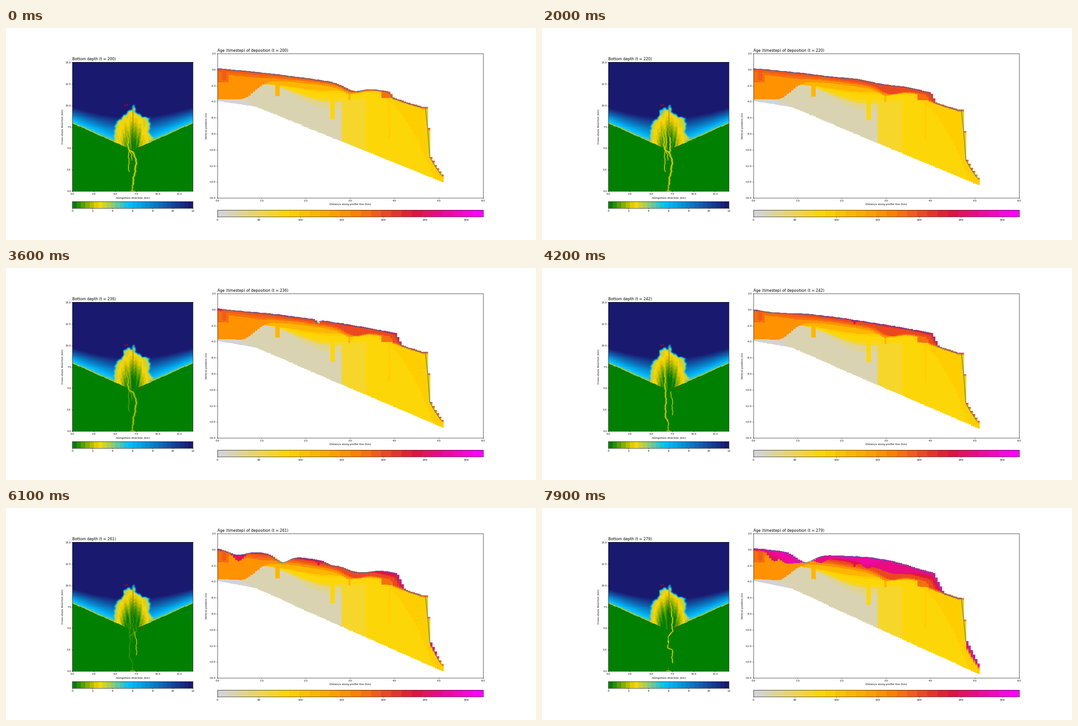
A matplotlib script for the animation above (8000 ms loop, 1183x473 px).

```python
import numpy as np
import matplotlib.pyplot as plt
from matplotlib.animation import FuncAnimation
from matplotlib.colors import LinearSegmentedColormap
from matplotlib.path import Path

W, H = 1183, 473
T0, STEPS = 200, 80
rng = np.random.default_rng(4)
fig = plt.figure(figsize=(W / 72, H / 72), dpi=72, facecolor="white")


# ---------- layout helpers ----------
def panel(left, top, right, bottom):
    ax = fig.add_axes([left / W, 1 - bottom / H, (right - left) / W, (bottom - top) / H])
    for side in ax.spines.values():
        side.set_linewidth(0.7)
    return ax


def ticks(ax, xs, ys, fmt, size):
    ax.set_xticks(xs, [fmt % v for v in xs])
    ax.set_yticks(ys, [fmt % v for v in ys])
    ax.tick_params(length=2.2, width=0.6, labelsize=size)
    ax.tick_params(axis="x", pad=2)
    ax.tick_params(axis="y", pad=1.2)


def label(x, y, text, size=5.9, **kw):
    kw = {"ha": "center", "va": "center", **kw}
    return fig.text(x / W, 1 - y / H, text, fontsize=size, **kw)


def color_bar(left, top, right, bottom, cmap, vmax, step, size):
    ax = panel(left, top, right, bottom)
    ax.imshow(np.linspace(0, vmax, 1200)[None], extent=(0, vmax, 0, 1), aspect="auto",
              cmap=cmap, interpolation="nearest")
    ticks(ax, range(0, vmax + 1, step), [], "%d", size)


def smooth(s):
    s = np.clip(s, 0, 1)
    return s * s * (3 - 2 * s)


depth_map = LinearSegmentedColormap.from_list(
    "depth", [(0, "green"), (0.21, "gold"), (0.47, "deepskyblue"), (1, "midnightblue")], N=28)
age_map = LinearSegmentedColormap.from_list(
    "age", ["lightgray", "gold", "darkorange", "crimson", "magenta"], N=26)


# ---------- cross section ----------
DX, DZ, ZMIN = 0.05, 0.03, -15.0
x = np.arange(102) * DX
z = np.arange(ZMIN, 1, DZ)[:, None]
base = np.minimum(-4 - 0.8 * x, -4.7 - 2.22 * (x - 0.85))
tail = np.interp(x, [3.95, 4.3, 4.6, 4.7, 4.75, 4.8, 4.9, 5.1],
                 [-3.55, -4.22, -4.7, -4.7, -7.3, -10.9, -11.9, -13.5], left=-9)
grade = 0.1 - 0.45 * x - 0.08 * x ** 2

# scours and mounds: centre, width, height, start, peak, end (and drift per step)
events = [
    (3.05, .28, -.90, 190, 203, 209), (2.30, .35, .45, 203, 212, 224),
    (3.50, .40, .38, 204, 212, 226), (.05, .08, -.30, 224, 229, 234),
    (2.25, .05, -.50, 232, 237, 241), (.45, .55, -.28, 234, 242, 250),
    (.45, .17, -1.3, 244, 248, 252), (3.35, .20, -.45, 244, 250, 262),
    (.42, .04, -.90, 250, 254, 257), (3.75, .20, .30, 248, 255, 262),
    (.75, .28, -1.5, 256, 269, 310, .04), (1.45, .22, -.90, 256, 261, 267),
    (3.10, .40, -.75, 255, 261, 267), (2.55, .17, -.75, 257, 267, 275),
    (3.30, .45, .85, 261, 269, 280), (2.75, .90, .60, 268, 279, 290),
]


def sink(t):
    return 0.0191 * (t - T0) * x / 5.1


def bed(t):
    """Bed level with subsidence taken out."""
    top = grade.copy()
    for mid, width, height, start, peak, end, *drift in events:
        mid = mid + sum(drift) * (t - peak)
        top += np.interp(t, [start, peak, end], [0, height, 0]) * np.exp(-((x - mid) / width) ** 2)
    front = np.interp(t, [200, 206, 279], [3.88, 3.97, 4.05])
    top -= 10 * np.maximum(x - front, 0)
    return np.maximum(top + sink(t), tail)


age = np.full((len(z), len(x)), 4.0)


def layer(value, floor, x0=0.0, x1=9.0):
    """Raise the age of all cells above the floor to at least this value."""
    inside = (z > floor) & (x > x0 - 0.01) & (x < x1 - 0.01)
    age[inside] = np.maximum(age[inside], value)


layer(16, -3.75 - 0.9 * smooth((x - 0.4) / 0.5))
layer(16, -20, 0.9)
layer(62, -20 + 11 * (x < 2.9), 2.8)
layer(75, -20, 3.35)
layer(98, -3 - 5.05 * np.maximum(x - 3.4, 0) ** 2, 3.0)
for value, drop in [(28, 3.0), (62, 2.2), (75, 1.8), (98, 1.1), (113, 0.8)]:
    layer(value, -1.9 - drop * smooth((x - 1) / 1.5), 1.0)
layer(148, -3.75 + 2.1 * smooth((x - 0.5) / 0.65), 0, 1.15)
thick = 0.6 + 0.6 * np.exp(-np.maximum(x - 1, 0) / 0.5) - 0.35 * smooth((x - 2.9) / 0.2)
for value, part in [(148, 1), (176, 0.6), (188, 0.35), (198, 0.12)]:
    layer(value, bed(T0) - part * thick)
# narrow old channels cut into the layers
for value, x0, x1, floor in [(176, 0, .25, -1.65), (188, .1, .2, -1.4), (113, 1.3, 1.4, -3.35),
                             (75, 2.55, 2.65, -6.2), (113, 2.95, 3.0, -3.9),
                             (98, 3.85, 3.9, -8.5), (176, 3.7, 3.95, -3.6)]:
    layer(value, floor, x0, x1)

age[(z < base) | (z > bed(T0))] = np.nan
history = []
for t in range(T0, T0 + STEPS):
    filled = (z <= bed(t)) & (z >= base)
    age[filled & np.isnan(age)] = t
    age[~filled] = np.nan
    history.append(age.astype(np.float32))

row_z = 2 - (np.arange(322)[:, None] + 0.5) * 18 / 322


def section(i):
    idx = np.rint((row_z + sink(T0 + i) - ZMIN) / DZ).astype(int)
    out = np.take_along_axis(history[i], idx.clip(0, len(z) - 1), 0)
    return np.ma.masked_invalid(np.where((idx < 0) | (idx >= len(z)), np.nan, out))


# ---------- depth map ----------
XMAX, YMAX, MID = 14.1, 15.05, 7.05
X, Y = np.meshgrid(np.arange(0.025, XMAX, 0.05), np.arange(0.025, YMAX, 0.05))
U = np.abs(X - MID) / MID
shore = 4.8 + 3.15 * U


def blur(a, s=1.6):
    k = np.exp(-0.5 * (np.arange(-6, 7) / s) ** 2)
    k /= k.sum()
    for axis in (0, 1):
        a = np.apply_along_axis(np.convolve, axis, a, k, "same")
    return a


# ragged delta outline, and the head that grows on its left side
wx = X + 0.06 * np.sin(11 * Y) + 0.04 * np.sin(23 * Y + 2 * X)
wy = Y + 0.07 * np.sin(10 * X + 1) + 0.04 * np.sin(27 * X)
outline = Path([(MID, 4.6), (5, 5.7), (4.9, 6.5), (5.1, 7.9), (5.7, 8.5), (6.3, 9.1), (6.9, 9.5),
                (7.1, 10), (7.28, 10), (7.4, 9.2), (8.2, 8.7), (8.9, 8.5), (9.1, 7.6),
                (8.9, 6.8), (9.5, 6.1), (8.9, 5.6)])
body = outline.contains_points(np.c_[wx.ravel(), wy.ravel()]).reshape(X.shape)
head = np.hypot((wx - 6.5) / 0.5, (wy - 9.0) / 0.7) < 1
lobe_a, lobe_b = blur(body * 1.0), blur((body | head) * 1.0)

reach = np.hypot((X - MID) / 2, (Y - 5) / 4.6)
fan = (X - MID) / np.maximum(Y - 2, 0.5)
streak = sum(np.sin(f * fan + p + 0.3 * Y) for f, p in
             zip(rng.uniform(15, 60, 4), rng.uniform(0, 6.3, 4)))
streak = 0.28 * streak * (1.1 - reach).clip(0, 0.8)


def channel(start, end, width, *pts):
    """Depth field of a winding channel and the steps between which it is open."""
    d = np.full(X.shape, 9.0)
    px = X + 0.04 * np.sin(5 * Y) + 0.02 * np.sin(13 * Y)
    for (x0, y0), (x1, y1) in zip(pts, pts[1:]):
        vx, vy = x1 - x0, y1 - y0
        f = (((px - x0) * vx + (Y - y0) * vy) / (vx * vx + vy * vy)).clip(0, 1)
        d = np.minimum(d, np.hypot(px - x0 - f * vx, Y - y0 - f * vy))
    return 2.3 * np.exp(-(d / width) ** 2), start, end


channels = [
    channel(0, 238, .11, (7.06, 0), (7.06, .7), (7.48, 3.1), (7.4, 3.9), (7.16, 4.5), (6.6, 4.75),
            (6.5, 6), (6.2, 8.3)),
    channel(0, 236, .06, (6.6, 2.3), (6.6, 4.7), (6.95, 4.3), (6.95, 3.6)),
    channel(207, 228, .10, (7.16, 4.5), (7.3, 5.3), (7.1, 7), (7.15, 8.7)),
    channel(207, 236, .09, (6.6, 4.75), (6.8, 5.4), (6.6, 9)),
    channel(238, 260, .09, (7.06, 0), (7, 1), (6.66, 1.8), (6.74, 3.9), (6.64, 4.9), (6.6, 8.6)),
    channel(238, 277, .05, (7.5, 1.9), (7.5, 3.5), (7.3, 4.6)),
    channel(249, 261, .07, (6.74, 4.1), (7.16, 4.4), (7.05, 8)),
    channel(262, 999, .08, (6.95, 3.4), (7.05, 4), (7.48, 4.65), (7.5, 6), (7.3, 8)),
    channel(272, 999, .07, (7.5, 1), (7.48, 2.5), (6.95, 2.7), (7.06, 3.5)),
    channel(0, 999, .05, (6.8, .02), (7.3, .02), (7.06, .02), (7.06, .3)),
]


def depth(i):
    t, s = T0 + i, i / (STEPS - 1)
    deep = 8.65 - 0.22 * s + 1.2 * U ** 1.6
    sea = 4.5 + 7.5 * ((Y - shore) / (deep - shore)).clip(0, 1)
    m = lobe_a + smooth(i / 26) * (lobe_b - lobe_a)
    top = (2.7 + 0.6 * s) * smooth((reach - 0.2 * s) / (1.0 - 0.05 * s)) + 0.3 * (1 - s)
    out = np.where(Y < shore, 0, sea * (1 - m) + (top + streak).clip(0) * m)
    out[(np.abs(Y - shore) < 0.03) & (U > 0.25)] = 2.3
    for field, start, end in channels:
        out = np.maximum(out, smooth((t - start + 4) / 8) * smooth((end + 4 - t) / 8) * field)
    return out


# ---------- figure ----------
plan = panel(148.3, 76.2, 416.9, 364)
plan_img = plan.imshow(depth(0), extent=(0, XMAX, 0, YMAX), origin="lower", aspect="auto",
                       cmap=depth_map, vmin=0, vmax=12, interpolation="nearest")
plan.plot([MID, MID], [5, 10], color="#6b2a1a", lw=0.9, alpha=0.85)
plan.text(6.0, 9.92, "Left", color="red", fontsize=5.9, alpha=0.85)
plan.text(7.72, 4.95, "Right", color="red", fontsize=5.9, alpha=0.6)
plan.set(xlim=(0, XMAX), ylim=(0, YMAX))
ticks(plan, np.arange(0, 13, 2.5), np.arange(0, 16, 2.5), "%.1f", 5.6)

prof = panel(471.5, 57, 1064.7, 379.2)
prof_img = prof.imshow(section(0), extent=(0, 5.1, -16, 2), aspect="auto", cmap=age_map,
                       vmin=0, vmax=320, interpolation="nearest")
line, = prof.plot([], [], color="#1f77b4", lw=1.15)
prof.set(xlim=(0, 6), ylim=(-16, 2))
ticks(prof, range(7), range(2, -17, -2), "%.1f", 5.6)

color_bar(148.3, 386.9, 416.9, 402.3, depth_map, 12, 2, 5.9)
color_bar(471.5, 405.5, 1064.7, 421.3, age_map, 320, 50, 6.1)

label(283, 379, "Alongshore direction (km)")
label(126.3, 220, "Cross-shore direction (km)", rotation=90)
label(768, 393.7, "Distance along profile line (km)")
label(448, 218, "Vertical position (m)", rotation=90)
plan_title = label(148, 72.5, "", 8.25, ha="left", va="baseline")
prof_title = label(471.5, 53.4, "", 8.25, ha="left", va="baseline")


def draw(i):
    t = T0 + i
    plan_title.set_text(f"Bottom depth (t = {t})")
    prof_title.set_text(f"Age (timestep) of deposition (t = {t})")
    plan_img.set_data(depth(i))
    prof_img.set_data(section(i))
    line.set_data(x, bed(t) - sink(t))
    return plan_img, prof_img, line, plan_title, prof_title


anim = FuncAnimation(fig, draw, frames=STEPS, interval=100, repeat=True, repeat_delay=0, blit=False)
plt.show()
```
